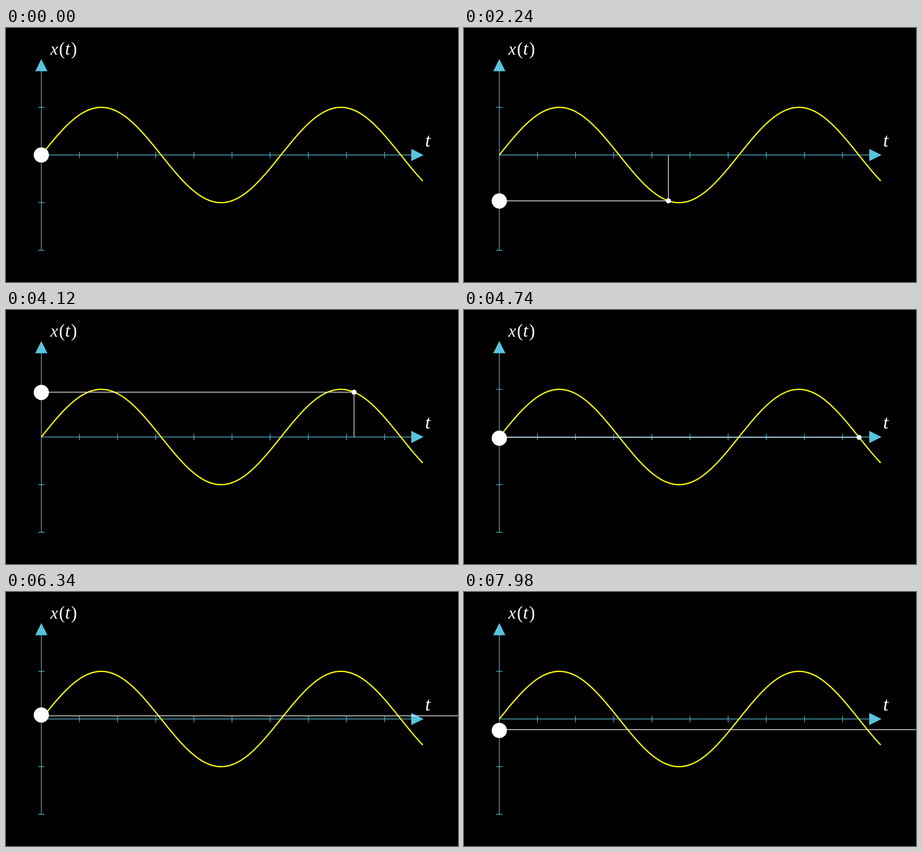
Write an HTML page with a canvas that moves like this. It is 998x561 px and loops after 8000 ms.

```html
<!DOCTYPE html>
<html lang="en">
<head>
<meta charset="utf-8">
<title>x(t)</title>
<style>
  html, body { margin: 0; width: 100%; height: 100%; overflow: hidden; background: #000; }
  canvas { display: block; }
</style>
</head>
<body>
<canvas id="stage" width="998" height="561"></canvas>
<script>
const ctx = document.getElementById("stage").getContext("2d");
const W = 998, H = 561, LOOP = 8000, STEP = 20;
const BLUE = "#58c4dd", YELLOW = "#ffff00", WHITE = "#fff";

// Scene units to pixels
const S = W * 9 / 128;
const X0 = W / 2 - 6 * S, Y0 = H / 2;
const UX = 1.2 * S, UY = 1.5 * S;
const px = u => X0 + UX * u;
const py = v => Y0 - UY * v;

function line(color, width, ...pts) {
  ctx.strokeStyle = color;
  ctx.lineWidth = width;
  ctx.beginPath();
  pts.forEach(([x, y]) => ctx.lineTo(x, y));
  ctx.stroke();
}

function triangle(...pts) {
  ctx.fillStyle = BLUE;
  ctx.beginPath();
  pts.forEach(([x, y]) => ctx.lineTo(x, y));
  ctx.fill();
}

function disc(x, y, r) {
  ctx.fillStyle = WHITE;
  ctx.beginPath();
  ctx.arc(x, y, r, 0, 2 * Math.PI);
  ctx.fill();
}

function glyph(text, x, y, size, style) {
  ctx.fillStyle = WHITE;
  ctx.font = `${style} ${size}px "Liberation Serif", serif`;
  ctx.fillText(text, x, y);
}

function axes() {
  const w = 0.02 * S, tick = 0.1 * S;
  line(BLUE, w, [X0, Y0], [px(10), Y0]);
  line(BLUE, w, [X0, py(-2)], [X0, py(2)]);
  for (let k = 1; k < 10; k++) line(BLUE, w, [px(k), Y0 - tick], [px(k), Y0 + tick]);
  for (const k of [-2, -1, 1]) line(BLUE, w, [X0 - tick, py(k)], [X0 + tick, py(k)]);
  triangle([X0, 68.4], [X0 - 13.4, 95.6], [X0 + 13.4, 95.6]);
  triangle([921.8, Y0], [894.7, Y0 - 13.4], [894.7, Y0 + 13.4]);
}

function labels() {
  glyph("x", 98, 58.8, 38, "italic");
  glyph("(", 117, 59.2, 39, "normal");
  glyph("t", 130.5, 58.8, 40, "italic");
  glyph(")", 143.7, 59.2, 39, "normal");
  glyph("t", 925.6, 261.5, 42, "italic");
}

function curve() {
  const pts = [];
  for (let u = 0; u <= 10.001; u += 0.05) pts.push([px(u), py(Math.sin(u))]);
  line(YELLOW, 0.04 * S, ...pts);
}

function draw(ms) {
  // The motion advances in thirtieths; the tracer trails the ball by half a step
  const step = Math.round(Math.floor(ms / STEP + 0.05) * 1.2);
  const u = Math.max(0, (step - 1) / 30);
  const ball = Math.max(0, (step - 0.5) / 30);
  const x = px(u), y = py(Math.sin(u));

  ctx.fillStyle = "#000";
  ctx.fillRect(0, 0, W, H);
  axes();
  labels();
  curve();
  line(WHITE, 0.02 * S, [x, Y0], [x, y]);
  line(WHITE, 0.02 * S, [X0, y], [x, y]);
  disc(x, y, 0.08 * S);
  disc(X0, py(Math.sin(ball)), 0.24 * S);
}

const start = performance.now();
function tick() {
  draw((performance.now() - start) % LOOP);
  requestAnimationFrame(tick);
}
tick();
</script>
</body>
</html>
```
